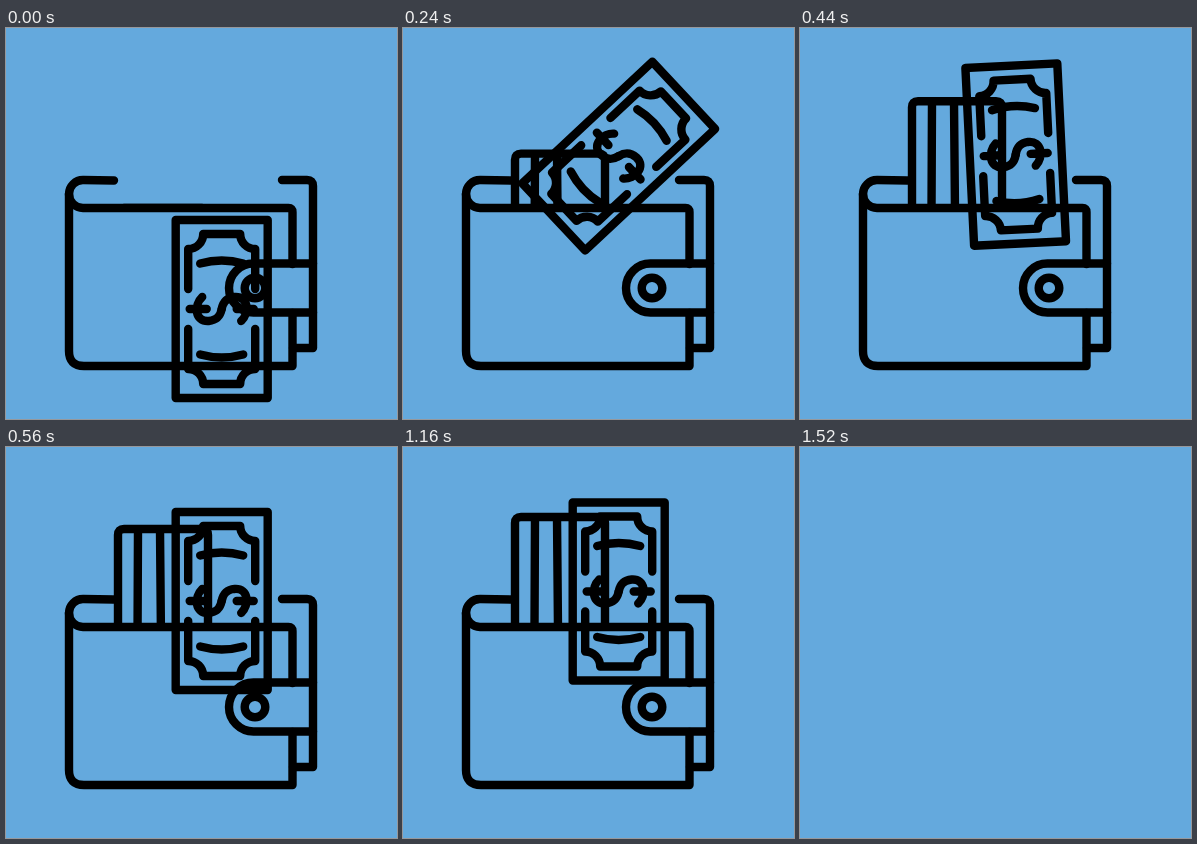
An HTML page that plays this animation: 391x391 px, repeating every 1.56 s.

```html
<!DOCTYPE html>
<html lang="en">
<head>
<meta charset="utf-8">
<title>Wallet</title>
<style>
  html, body { margin: 0; width: 100%; height: 100%; overflow: hidden; background: #64a9dd; }
  svg { display: block; width: 100%; height: 100%; }
  #scene { fill: none; stroke: #000; stroke-width: 8.4; stroke-linecap: round; stroke-linejoin: round; }
</style>
</head>
<body>
<svg viewBox="0 0 391 391">
  <defs>
    <clipPath id="aboveWallet"><rect width="391" height="180"/></clipPath>
    <g id="billHalf">
      <path d="M-33.5-20V-60A15 15 0 0 0-18.5-75H18.5A15 15 0 0 0 33.5-60V-20"/>
      <path d="M-21.5-45.5Q0-51.5 21.5-45.5"/>
      <path d="M-32 0H-15M-19.5-12C-28-4-27 13-13 12C-3 11-1 5 0 0"/>
    </g>
  </defs>
  <g id="scene">
    <g clip-path="url(#aboveWallet)">
      <path id="cards" d="M112 112V6Q112 0 118 0H196Q202 0 202 6V112M132 0L131.5 112M154 0L155 112"/>
    </g>
    <g id="wallet">
      <path d="M108 152.500L77 152A14 14 0 0 0 77 180H282.500Q286.500 180 286.500 184V236"/>
      <path d="M63 166V323Q63 338 78 338H286.500V285"/>
      <path d="M276 152H301Q307 152 307 158V320H287"/>
      <path d="M307 235.500H247.500A24.500 24.500 0 0 0 247.500 284.500H307"/>
      <circle cx="249" cy="260" r="10.300"/>
    </g>
    <g id="bill">
      <rect x="-46" y="-89" width="92" height="178"/>
      <use href="#billHalf"/>
      <use href="#billHalf" transform="rotate(180)"/>
    </g>
  </g>
</svg>
<script>
  const LOOP = 1560, STEP = 40, BLANK_FROM = 1520;

  // [time in ms, value], eased in and out between neighbours
  const billY = [[40, 281], [310, 97.5], [565, 154], [760, 142], [1135, 142], [1450, 281]];
  const billTurn = [[127, 0], [465, 180]];
  const cardsY = [[145, 180], [340, 67], [565, 82], [760, 70], [1160, 70], [1450, 180]];

  const smooth = x => x * x * (3 - 2 * x);

  function valueAt(track, t) {
    const next = track.findIndex(([time]) => time > t);
    if (next === 0) return track[0][1];
    if (next < 0) return track[track.length - 1][1];
    const [t0, v0] = track[next - 1], [t1, v1] = track[next];
    return v0 + (v1 - v0) * smooth((t - t0) / (t1 - t0));
  }

  const [scene, bill, cards] = ['scene', 'bill', 'cards'].map(id => document.getElementById(id));
  const start = performance.now();

  function draw() {
    const elapsed = (performance.now() - start) % LOOP;
    const step = Math.floor(elapsed / STEP) * STEP;
    const t = step < 80 ? 0 : step;
    scene.style.visibility = t >= BLANK_FROM ? 'hidden' : 'visible';
    bill.setAttribute('transform', `translate(215.7 ${valueAt(billY, t)}) rotate(${valueAt(billTurn, t)})`);
    cards.setAttribute('transform', `translate(0 ${valueAt(cardsY, t)})`);
    requestAnimationFrame(draw);
  }
  draw();
</script>
</body>
</html>
```
